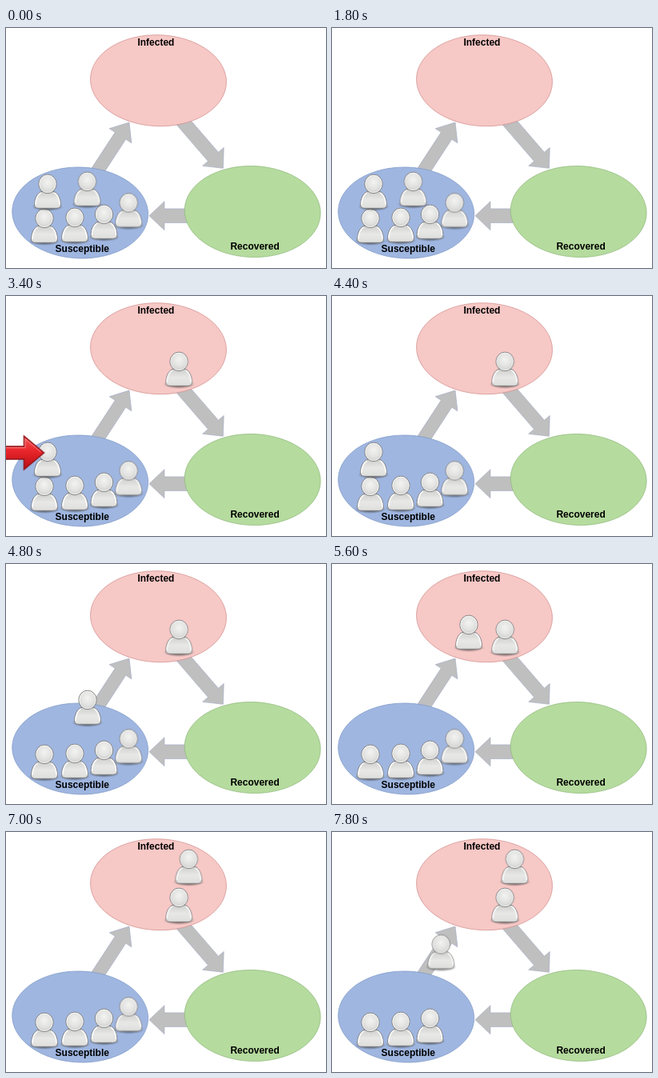
Recreate the animation shown at these times as an HTML page. Size 400 px wide and 300 px high, loop 8 s.

```html
<!DOCTYPE html>
<html lang="en">
<head>
<meta charset="utf-8">
<title>Infection cycle</title>
<style>
  html, body { margin: 0; width: 100%; height: 100%; overflow: hidden; background: #fff; }
  svg { display: block; width: 400px; height: 300px; }
  text { font: bold 12px "Liberation Sans", Arial, sans-serif; fill: #000; }
  .flow { fill: #bfbfbf; stroke: #a2aac4; stroke-width: .6; }
  .zone { stroke-width: .7; }
</style>
</head>
<body>
<svg viewBox="0 0 400 300">
  <defs>
    <radialGradient id="headFill" cx=".5" cy=".4" r=".62">
      <stop offset="0" stop-color="#f3f3f2"/>
      <stop offset=".6" stop-color="#e2e2e1"/>
      <stop offset="1" stop-color="#cacac9"/>
    </radialGradient>
    <linearGradient id="bodyFill" x2="0" y2="1">
      <stop offset="0" stop-color="#cfcfce"/>
      <stop offset=".5" stop-color="#e8e8e7"/>
      <stop offset="1" stop-color="#dededd"/>
    </linearGradient>
    <radialGradient id="shade">
      <stop offset=".5" stop-color="#333" stop-opacity=".55"/>
      <stop offset="1" stop-color="#333" stop-opacity="0"/>
    </radialGradient>
    <linearGradient id="red" x2="0" y2="1">
      <stop offset="0" stop-color="#f4575b"/>
      <stop offset=".45" stop-color="#e8262b"/>
      <stop offset="1" stop-color="#b80d14"/>
    </linearGradient>
    <g id="person">
      <ellipse cy="40.5" rx="19.5" ry="5.5" fill="url(#shade)"/>
      <path d="M-16.4 38C-16.3 30.5-13.3 24-8.5 21.5H8.5C13.3 24 16.3 30.5 16.4 38Q16.4 42.3 11 42.3H-11Q-16.4 42.3-16.4 38Z"
            fill="url(#bodyFill)" stroke="#7c7c7c" stroke-width=".9"/>
      <path d="M-15 38C-14.9 31.2-12.2 25.3-8.4 23.1M15 38C14.9 31.2 12.2 25.3 8.4 23.1"
            fill="none" stroke="#fff" stroke-width="1.4"/>
      <ellipse cy="11.9" rx="11.2" ry="11.8" fill="url(#headFill)" stroke="#7c7c7c" stroke-width=".9"/>
      <ellipse cy="11.9" rx="10.1" ry="10.7" fill="none" stroke="#fff" stroke-opacity=".7" stroke-width="1"/>
    </g>
  </defs>
  <g id="flows"></g>
  <g id="zones"></g>
  <text x="164.4" y="22">Infected</text>
  <text x="61.6" y="280">Susceptible</text>
  <text x="280.4" y="277">Recovered</text>
  <g id="people"></g>
  <g id="pointer" visibility="hidden">
    <path d="M-75-8H-25V-21L0 0L-25 21V8H-75Z" fill="url(#red)" stroke="#8e1217" stroke-width="1.4"/>
    <path d="M-74-6.3H-23.5V-17.2L-4-1" fill="none" stroke="#ff9a9a" stroke-opacity=".75" stroke-width="1"/>
  </g>
</svg>
<script>
const LOOP = 8000, STEP = 200;
const $ = id => document.getElementById(id);

function add(parent, tag, attrs) {
  const el = document.createElementNS("http://www.w3.org/2000/svg", tag);
  for (const key in attrs) el.setAttribute(key, attrs[key]);
  return parent.appendChild(el);
}

// Block arrow from (x, y) to its tip.
function flow(x, y, tipX, tipY, head, halfHead, halfShaft) {
  const len = Math.hypot(tipX - x, tipY - y);
  const angle = Math.atan2(tipY - y, tipX - x) * 180 / Math.PI;
  const neck = len - head;
  add($("flows"), "path", {
    class: "flow",
    transform: `translate(${x} ${y}) rotate(${angle})`,
    d: `M0 ${-halfShaft}H${neck}V${-halfHead}L${len} 0L${neck} ${halfHead}V${halfShaft}H0Z`
  });
}
flow(107.6, 189, 154, 118, 20, 16.5, 8);
flow(212.4, 107, 271.4, 175.3, 19, 17.5, 8.5);
flow(235, 234.7, 179, 234.7, 19, 18, 8.8);

// The circles of the cycle lean slightly clockwise.
function zone(x, y, fill, stroke) {
  add($("zones"), "ellipse", {
    class: "zone", rx: 85, ry: 57, fill, stroke,
    transform: `translate(${x} ${y}) rotate(2)`
  });
}
zone(190.5, 65.7, "#f6c8c6", "#d08c8a");
zone(92.7, 231, "#9fb6e0", "#7c97c6");
zone(308.2, 229.5, "#b5db9e", "#8fb87b");

const at = (x, y) => `translate(${x}px, ${y}px)`;

// Each row is [time, value]; values are held until the next row.
function hold(el, prop, rows) {
  const frames = rows.map(([t, v]) => ({ offset: t / LOOP, [prop]: v, easing: "step-end" }));
  frames.push({ offset: 1, [prop]: rows[rows.length - 1][1] });
  el.animate(frames, { duration: LOOP, iterations: Infinity });
}

// Splits straight legs between [time, x, y] points into discrete steps.
function walk(el, points) {
  const rows = [[0, at(points[0][1], points[0][2])]];
  for (let i = 1; i < points.length; i++) {
    const [t0, x0, y0] = points[i - 1], [t1, x1, y1] = points[i];
    for (let t = t0 + STEP; t <= t1; t += STEP) {
      const k = (t - t0) / (t1 - t0);
      rows.push([t, at(x0 + (x1 - x0) * k, y0 + (y1 - y0) * k)]);
    }
  }
  hold(el, "transform", rows);
}

const spots = [[48, 226], [86, 225], [122.5, 221], [153.3, 206.5], [52, 183], [101.5, 180]];
const people = spots.map(([x, y]) => {
  const el = add($("people"), "use", { href: "#person" });
  el.style.transform = at(x, y);
  return el;
});

walk(people[5], [[2000, 101.5, 180], [2800, 216.2, 70]]);
walk(people[4], [[4400, 52, 183], [4800, 102, 158], [5600, 171, 64], [6000, 228.4, 22]]);
walk(people[3], [[7000, 153.3, 206.5], [7800, 136.3, 128.5]]);

hold($("pointer"), "transform", [[0, at(97, 193)], [3400, at(47.5, 196)], [6000, at(149, 219.5)]]);
hold($("pointer"), "visibility", [
  [0, "hidden"], [800, "visible"], [1800, "hidden"], [3400, "visible"],
  [4400, "hidden"], [6000, "visible"], [7000, "hidden"]
]);
</script>
</body>
</html>
```
